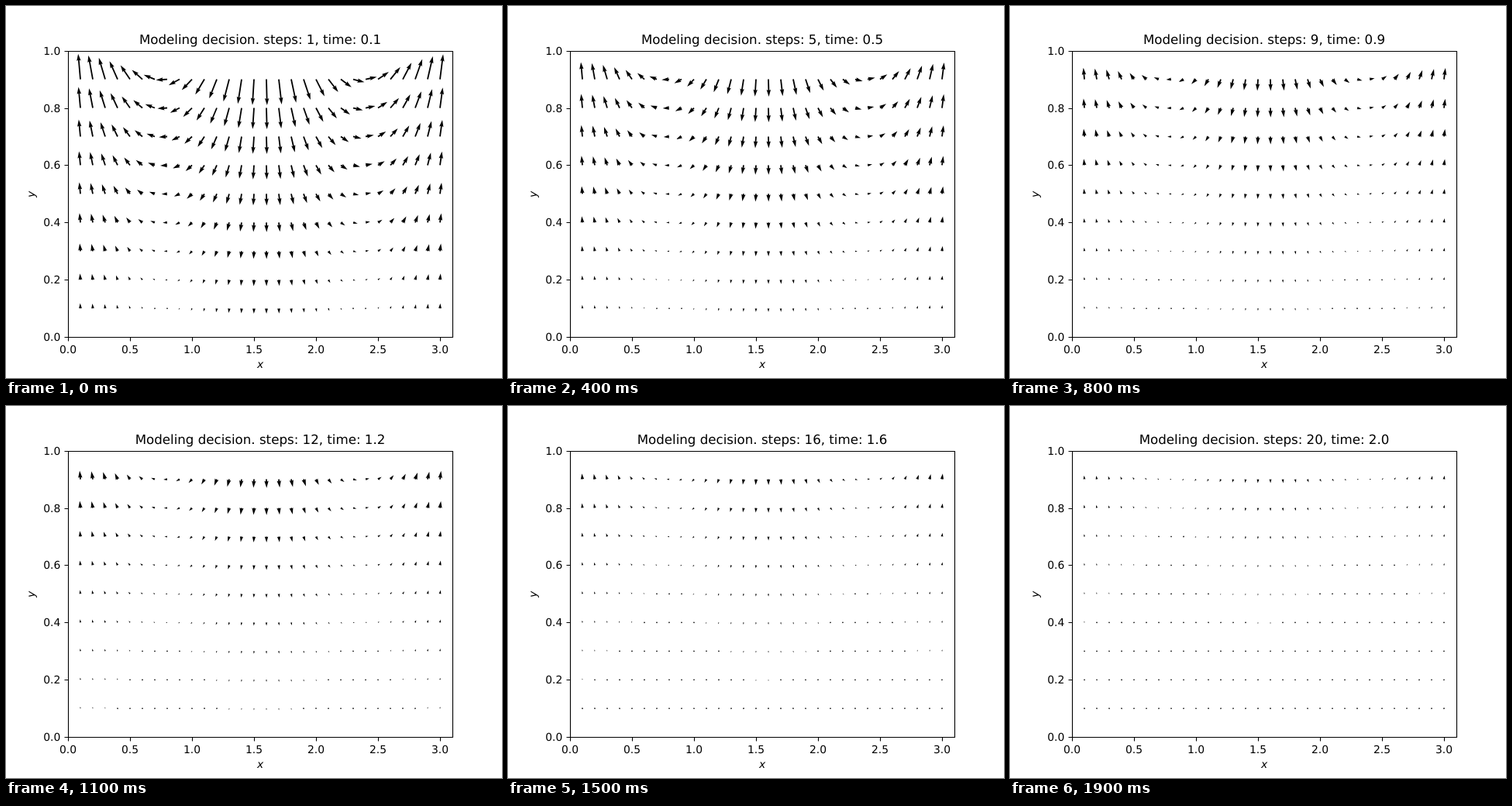
Write an HTML page that moves like this. It is 640x480 px and loops after 2 s.

```html
<!DOCTYPE html>
<html lang="en">
<head>
<meta charset="utf-8">
<title>Vector field</title>
<style>
  html, body { margin: 0; width: 100%; height: 100%; overflow: hidden; background: #fff; }
  svg { display: block; width: 640px; height: 480px; }
  text { font: 13.889px "DejaVu Sans", sans-serif; text-rendering: geometricPrecision; text-anchor: middle; }
  #title { font-size: 16.667px; }
  .name { font-style: italic; }
  .tick { text-anchor: end; }
  #axes { fill: none; stroke: #000; stroke-width: 1.111; }
</style>
</head>
<body>
<svg viewBox="0 0 640 480">
  <path id="arrows"/>
  <path id="axes"/>
  <g id="labels"></g>
  <text class="name" x="328" y="467">x</text>
  <text class="name" transform="translate(37 243) rotate(-90)">y</text>
  <text id="title" x="328" y="49"></text>
</svg>
<script>
const STEP_MS = 100, STEPS = 20;
const LEFT = 80, BOTTOM = 427.2, X_UNIT = 160, Y_UNIT = 369.6;
const SHAFT = 1.811;          // shaft width in px; arrow outlines are in this unit
const AMPLITUDE = 6.13;       // px per field unit at time 0
const HEAD = 5, HEAD_INNER = 4.5, HEAD_HALF = 1.5;

const byId = id => document.getElementById(id);
const toX = x => LEFT + x * X_UNIT;
const toY = y => BOTTOM - y * Y_UNIT;
const snap = v => Math.floor(v + 0.5) + 0.5;

function field(x, y, time) {
  const k = AMPLITUDE * Math.exp(-time);
  return [-2.55 * k * Math.sin(2 * x) * Math.sinh(y), k * Math.cos(2 * x) * Math.exp(2 * y)];
}

// Outline along +x: a hexagon dot when tiny, a scaled-down arrow when short.
function outline(length) {
  if (length < 1) {
    return Array.from({ length: 6 }, (_, i) =>
      [0.5 * Math.cos(i * Math.PI / 3), 0.5 * Math.sin(i * Math.PI / 3)]);
  }
  const full = Math.max(length, HEAD), scale = length / full;
  const side = [[0, 0.5], [full - HEAD_INNER, 0.5], [full - HEAD, HEAD_HALF]];
  const other = side.map(([x, y]) => [x, -y]).reverse();
  return [...side, [full, 0], ...other].map(([x, y]) => [x * scale, y * scale]);
}

function arrow(x, y, time) {
  const [u, v] = field(x, y, time);
  const length = Math.hypot(u, v), cos = u / length, sin = -v / length;
  const points = outline(length / SHAFT).map(([a, b]) =>
    (toX(x) + SHAFT * (a * cos - b * sin)).toFixed(3) + " " +
    (toY(y) + SHAFT * (a * sin + b * cos)).toFixed(3));
  return "M" + points.join("L") + "Z";
}

function drawAxes() {
  let path = "M80.5 58.5H576.5V427.5H80.5Z", labels = "";
  for (let i = 0; i <= 6; i++) {
    const x = toX(i / 2);
    path += `M${snap(x)} 427.5v5`;
    labels += `<text x="${x}" y="448">${(i / 2).toFixed(1)}</text>`;
  }
  for (let i = 0; i <= 5; i++) {
    const y = snap(toY(i / 5));
    path += `M80.5 ${y}h-5`;
    labels += `<text class="tick" x="70.3" y="${y + 4.5}">${(i / 5).toFixed(1)}</text>`;
  }
  byId("axes").setAttribute("d", path);
  byId("labels").innerHTML = labels;
}

function drawStep(step) {
  const time = step / 10;
  let path = "";
  for (let row = 1; row <= 9; row++) {
    for (let col = 1; col <= 30; col++) path += arrow(col / 10, row / 10, time);
  }
  byId("arrows").setAttribute("d", path);
  byId("title").textContent = `Modeling decision. steps: ${step}, time: ${time.toFixed(1)}`;
}

let start, shown = 1;
function tick(now) {
  start ??= now;
  const step = Math.floor((now - start) / STEP_MS) % STEPS + 1;
  if (step !== shown) drawStep(shown = step);
  requestAnimationFrame(tick);
}

drawAxes();
drawStep(shown);
requestAnimationFrame(tick);
</script>
</body>
</html>
```
